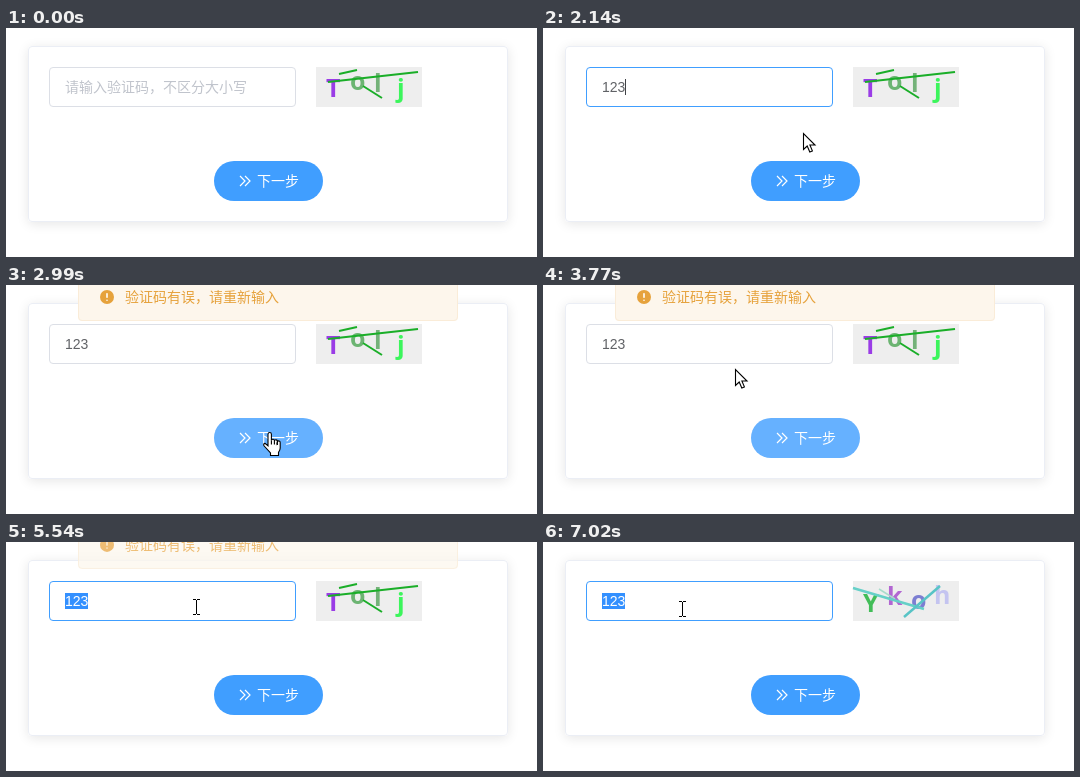
Recreate the animation shown at these times as an HTML page with a canvas. Size 531 by 229 pixels, loop 8000 ms.

```html
<!DOCTYPE html>
<html lang="zh">
<head>
<meta charset="utf-8">
<title>验证码</title>
<style>
  html, body { margin: 0; width: 100%; height: 100%; overflow: hidden; background: #fff; }
  canvas { display: block; width: 531px; height: 229px; }
</style>
</head>
<body>
<canvas id="stage" width="531" height="229"></canvas>
<script>
const ctx = document.getElementById('stage').getContext('2d');
const LOOP = 8000, TICK = 77.2;
const SANS = '"Noto Sans CJK SC", "Noto Sans CJK", sans-serif';
const BLUE = '#409eff', LIGHT_BLUE = '#66b1ff', GREY = '#dcdfe6', DARK_GREY = '#c0c4cc';

const INPUT = { x: 43, y: 39, w: 247, h: 40 };
const BUTTON = { x: 208, y: 133, w: 109, h: 40 };
const CAPTCHA = { x: 310, y: 39, w: 106, h: 40 };

// [time, x, y] of the pointer's hot spot
const POINTER = [
  [60, 430, 214], [230, 345, 150], [380, 272, 92], [530, 228, 64], [600, 224, 62], [760, 216, 59],
  [1850, 216, 59], [1990, 229, 70], [2144, 260, 105], [2300, 264, 147],
  [3240, 264, 147], [3620, 225, 100], [3930, 155, 65], [4070, 148, 63],
  [5470, 148, 63], [5617, 235, 68], [5770, 340, 63], [5880, 340, 63], [6080, 346, 60],
  [6260, 346, 60], [6400, 318, 77], [6550, 215, 76], [6699, 139, 67]
];
// [time, colour]: each colour is eased into from the one before
const BORDER = [
  [-999, GREY], [390, DARK_GREY], [790, BLUE], [2430, GREY], [3800, DARK_GREY],
  [4110, BLUE], [6080, GREY], [6500, DARK_GREY], [6740, BLUE]
];
const FILL = [[-999, BLUE], [2270, LIGHT_BLUE], [2430, '#3a8ee6'], [2520, LIGHT_BLUE], [4110, BLUE]];

const CODES = [
  {
    letters: [['T', 320, 69, '#9a3ce6'], ['o', 344, 62, '#6cb472'], ['l', 368, 64, '#74b279'], ['j', 391, 69, '#3cf55c']],
    lines: [[322, 54, 412, 44, '#1aae28', 2], [333, 46, 351, 42, '#1aae28', 2], [357, 58, 376, 70, '#1aae28', 2]]
  },
  {
    letters: [['Y', 320, 70, '#42bd58'], ['k', 344, 63, '#b266d2'], ['o', 368, 67, '#7c7ed2'], ['h', 391, 62, '#c4c4f0']],
    lines: [[336, 47, 352, 57, '#a9dccb', 1.5], [310, 46, 381, 67, '#66d0c8', 2.5], [361, 75, 397, 44, '#58c4c6', 2.5]]
  }
];

const ARROW = new Path2D('M.5 .5V16.5L4.2 13L6.8 19L9.4 17.9L6.9 12H12Z');
const HAND = new Path2D('M5 2.2a1.7 1.7 0 0 1 3.4 0V8.5a1.5 1.5 0 0 1 3 .5a1.5 1.5 0 0 1 3 .7' +
  'a1.5 1.5 0 0 1 2.8 1v5.3q0 2-1.7 4.4V23.5H7.5V21L1 13.8Q0 11.6 2 11.4L5 13.8Z');
const KNUCKLES = new Path2D('M8.4 8.5V12.5M11.4 9V12.5M14.4 9.8V13');

const clamp = v => Math.min(1, Math.max(0, v));
const lerp = (a, b, p) => a + (b - a) * p;
const inside = (r, x, y) => x >= r.x && x < r.x + r.w && y >= r.y && y < r.y + r.h;
const within = (t, a, b) => t >= a && t < b;

function bezier(x1, y1, x2, y2) {
  const curve = (a, b, s) => 3 * a * s * (1 - s) ** 2 + 3 * b * s * s * (1 - s) + s ** 3;
  return x => {
    let lo = 0, hi = 1;
    for (let i = 0; i < 20; i++) {
      const mid = (lo + hi) / 2;
      if (curve(x1, x2, mid) < x) lo = mid; else hi = mid;
    }
    return curve(y1, y2, lo);
  };
}
const ease = bezier(.25, .1, .25, 1);
const easeInOut = bezier(.645, .045, .355, 1);
const progress = (t, start, length, fn = ease) => fn(clamp((t - start) / length));

function mix(a, b, p) {
  const channel = (c, i) => parseInt(c.slice(i, i + 2), 16);
  return `rgb(${[1, 3, 5].map(i => Math.round(lerp(channel(a, i), channel(b, i), p)))})`;
}

function colourAt(track, t, length) {
  let i = track.length - 1;
  while (i > 0 && track[i][0] > t) i--;
  return mix(track[Math.max(0, i - 1)][1], track[i][1], progress(t, track[i][0], length, easeInOut));
}

function pointerAt(t) {
  const i = POINTER.findIndex(k => k[0] > t);
  if (i < 0) return POINTER[POINTER.length - 1].slice(1);
  const [t0, x0, y0] = POINTER[Math.max(0, i - 1)], [t1, x1, y1] = POINTER[i];
  const p = clamp((t - t0) / (t1 - t0));
  return [lerp(x0, x1, p), lerp(y0, y1, p)].map(Math.round);
}

function box(x, y, w, h, radius, fill, stroke) {
  ctx.beginPath();
  ctx.roundRect(x, y, w, h, radius);
  ctx.fillStyle = fill;
  ctx.fill();
  if (!stroke) return;
  ctx.beginPath();
  ctx.roundRect(x + .5, y + .5, w - 1, h - 1, radius - .5);
  ctx.lineWidth = 1;
  ctx.strokeStyle = stroke;
  ctx.stroke();
}

function label(text, x, y, colour, font = '14px ' + SANS) {
  ctx.font = font;
  ctx.fillStyle = colour;
  ctx.fillText(text, x, y);
}

function polyline(points, colour, width) {
  ctx.beginPath();
  points.forEach(([x, y]) => ctx.lineTo(x, y));
  ctx.strokeStyle = colour;
  ctx.lineWidth = width;
  ctx.stroke();
}

function drawCard() {
  ctx.save();
  ctx.shadowColor = 'rgba(0,0,0,.1)';
  ctx.shadowBlur = 12;
  ctx.shadowOffsetY = 2;
  box(22, 18, 480, 176, 4, '#fff');
  ctx.restore();
  box(22, 18, 480, 176, 4, '#fff', '#ebeef5');
}

function drawInput(t) {
  const { x, y, w, h } = INPUT;
  box(x, y, w, h, 4, '#fff', colourAt(BORDER, t, 200));
  const value = '123'.slice(0, Math.max(0, Math.floor((t - 1520) / 77) + 1));
  const selected = within(t, 4260, 6080) || t >= 6950;
  const caret = within(t, 790, 1290) || within(t, 1520, 2180) || within(t, 4110, 4260) || within(t, 6740, 6950);
  if (selected) box(59, 51, 23, 16, 0, '#3390ff');
  if (value) label(value, 59, 64, selected ? '#fff' : '#606266', '14px "Liberation Sans", Arial, sans-serif');
  else label('请输入验证码，不区分大小写', 59, 64, DARK_GREY);
  if (caret) box(59 + Math.floor(value.length * 7.79), 51, 1, 16, 0, '#404246');
}

function drawCaptcha(t) {
  const { x, y, w, h } = CAPTCHA, code = CODES[t < 6160 ? 0 : 1];
  box(x, y, w, h, 0, '#eee');
  code.letters.forEach(([c, cx, cy, colour]) => label(c, cx, cy, colour, 'bold 25px "Noto Sans", sans-serif'));
  code.lines.forEach(([x1, y1, x2, y2, colour, width]) => polyline([[x1, y1], [x2, y2]], colour, width));
}

function drawButton(t) {
  const { x, y, w, h } = BUTTON;
  box(x, y, w, h, 20, colourAt(FILL, t, 100));
  [234, 239].forEach(cx => polyline([[cx, 148], [cx + 5, 153], [cx, 158]], '#fff', 1.2));
  label('下一步', 251, 158, '#fff', '500 14px ' + SANS);
}

function drawMessage(t) {
  if (!within(t, 2570, 5800)) return;
  const leaving = t >= 5480, start = leaving ? 5480 : 2570;
  const fade = progress(t, start, 300), slide = progress(t, start, 400);
  ctx.save();
  ctx.globalAlpha = leaving ? 1 - fade : fade;
  ctx.translate(0, -48 * (leaving ? slide : 1 - slide));
  box(72, -12, 380, 48, 4, '#fdf6ec', '#faecd8');
  box(94, 5, 14, 14, 7, '#e6a23c');
  box(100.2, 8, 1.6, 5, .8, '#fff');
  box(100.2, 14.4, 1.6, 1.6, .8, '#fff');
  label('验证码有误，请重新输入', 119, 17, '#e6a23c');
  ctx.restore();
}

function drawPointer(t) {
  if (t < 50) return;
  const [x, y] = pointerAt(t);
  ctx.save();
  if (inside(INPUT, x, y)) {
    ctx.translate(x, y);
    [-8, 7].forEach(v => [-3, 1].forEach(u => box(u, v, 3, 1, 0, '#000')));
    box(0, -7, 1, 14, 0, '#000');
  } else {
    const hand = inside(BUTTON, x, y) || inside(CAPTCHA, x, y);
    ctx.translate(hand ? x - 7 : x, y);
    ctx.fillStyle = '#fff';
    ctx.strokeStyle = '#000';
    ctx.lineWidth = 1.1;
    ctx.fill(hand ? HAND : ARROW);
    ctx.stroke(hand ? HAND : ARROW);
    if (hand) ctx.stroke(KNUCKLES);
  }
  ctx.restore();
}

function draw(t) {
  ctx.fillStyle = '#fff';
  ctx.fillRect(0, 0, 531, 229);
  drawCard();
  drawInput(t);
  drawCaptcha(t);
  drawButton(t);
  drawMessage(t);
  drawPointer(t);
}

function frame() {
  const t = performance.now() % LOOP;
  draw(600 + TICK * Math.floor((t - 590) / TICK));
  requestAnimationFrame(frame);
}
frame();
</script>
</body>
</html>
```
